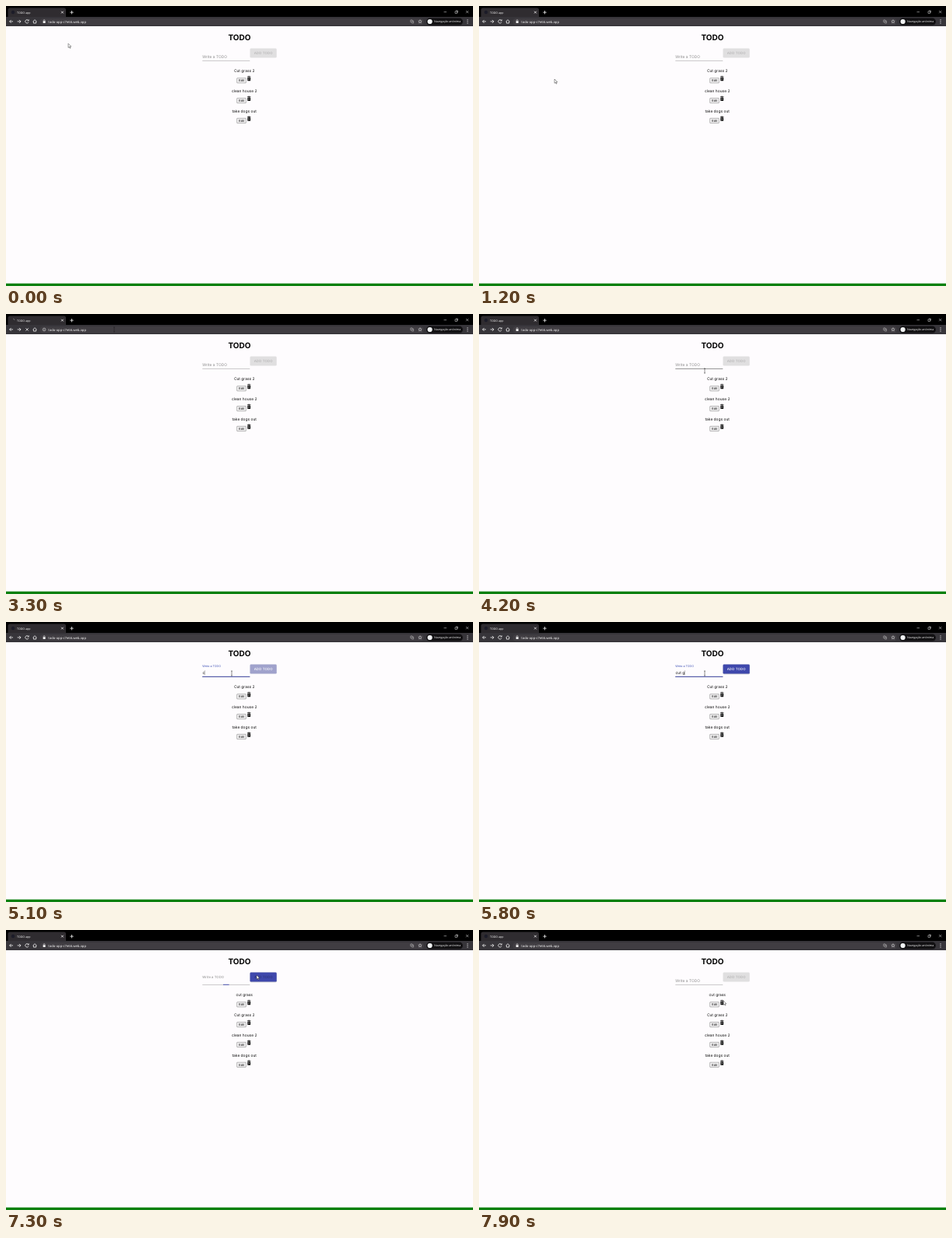
Recreate the animation shown at these times as an HTML page. Size 600x360 px, loop 8 s.

```html
<!DOCTYPE html>
<html lang="en">
<head>
<meta charset="utf-8">
<title>TODO app</title>
<style>
  html, body { margin: 0; width: 100%; height: 100%; overflow: hidden; background: #fefcfe; }
  svg { display: block; width: 100%; height: 100%; }
  text { font: 4.9px Inter, "Liberation Sans", sans-serif; fill: #111; text-rendering: geometricPrecision; white-space: pre; }
  .mid { text-anchor: middle; }
  .title { font-size: 10px; font-weight: 700; fill: #000; }
  .edit { font: 4.2px "Liberation Sans", sans-serif; }
  .add { font-size: 4.375px; font-weight: 500; letter-spacing: .125px; }
  .chrome text { font: 500 3.6px "Open Sans", "Noto Sans", sans-serif; fill: #fff; }
  .chrome .url { font-size: 4.2px; }
  .icon { fill: none; stroke: #f2f2f2; stroke-width: .8; }
  .thin { stroke-width: .5; }
</style>
</head>
<body>
<svg viewBox="0 0 600 360">
  <defs>
    <g id="bin">
      <path d="M310 90.800h4.400M311.300 90.400h1.800" stroke="#111" stroke-width=".7"/>
      <rect x="310.300" y="91.700" width="3.800" height="4.500" rx=".5" fill="#111"/>
      <path d="M311.400 93l1.600 1.600m0-1.600l-1.600 1.600" stroke="#fff" stroke-width=".45"/>
    </g>
  </defs>
  <rect width="600" height="360" fill="#fefcfe"/>
  <rect y="356.700" width="600" height="3.300" fill="#0a800f"/>

  <g class="chrome">
    <rect width="600" height="14" fill="#000"/>
    <rect x="2.500" y="2.500" width="74.500" height="14" rx="2.500" fill="#2f2c30"/>
    <rect y="14" width="600" height="12" fill="#37353a"/>
    <text x="14" y="9.500">TODO app</text>
    <path class="icon" d="M71 6.700l2.800 2.800m0-2.800l-2.800 2.800M84.500 6v4.400m-2.200-2.200h4.400"/>
    <path class="icon thin" d="M562.500 7.700h3.500M577 6.800h2.600v2.600H577zM578 6h2.400v2.600M591 6l3.200 3.200m0-3.200L591 9.200"/>

    <rect id="bar" x="43.400" y="15.900" width="493.400" height="8.600" rx="4.300" fill="#403d42" stroke-width=".6"/>
    <path class="icon" d="M9 19.900H4.600m2-2l-2 2 2 2M14.600 19.900H19m-2-2l2 2-2 2M34.500 20L37 17.700l2.500 2.300M35.400 19.600v2.500h3.200v-2.500"/>
    <g id="idle">
      <circle cx="9" cy="8" r="2.200" fill="#1c1c28"/>
      <path class="icon" d="M28.700 18.500A2.200 2.200 0 1 0 29 20.700M29.200 17.300v1.700h-1.700"/>
      <rect x="47.600" y="19.300" width="3" height="2.600" fill="#fff"/>
      <path class="icon thin" d="M48.200 19.300v-.8a.9.9 0 0 1 1.800 0v.8"/>
    </g>
    <g id="loading" class="icon">
      <path class="thin" d="M9 6A2.200 2.200 0 0 1 11 8" opacity=".6"/>
      <path d="M25.400 18.200l3.400 3.400m0-3.400l-3.400 3.400"/>
      <circle class="thin" cx="49.100" cy="20" r="1.900"/>
      <path class="thin" d="M49.100 19.600v1.500m0-2.400v.5"/>
    </g>
    <rect id="selection" x="54.200" y="17.200" width="49" height="6" fill="#8ab4f8"/>
    <text id="url" class="url" x="54.300" y="21.500">todo-app-c7e66.web.app</text>
    <path class="icon thin" opacity=".8" d="M519.800 18h2.200v2.800h-2.200zM522 19.200h1.600v2.800h-2.400"/>
    <polygon id="star" class="icon thin"/>
    <rect x="540" y="15.600" width="47" height="9" rx="4.500" fill="#121113"/>
    <circle cx="544.600" cy="20" r="3.100" fill="#f1f3f4"/>
    <text x="550" y="21.300">Navegação anónima</text>
    <path d="M593 17.300v5.400" stroke="#eee" stroke-dasharray="1.1"/>
  </g>

  <text class="mid title" x="300" y="44.400">TODO</text>

  <rect id="line" x="252.300" y="70" width="61" height=".6"/>
  <rect id="focusLine" y="69.800" height=".9" fill="#3f48b0"/>
  <text id="label">Write a TODO</text>
  <text x="252.500" y="66.600"><tspan id="typed"></tspan><tspan id="caret" font-weight="300" dx="-.4">|</tspan></text>

  <rect id="shadow" x="313.700" y="55.300" width="34" height="12" rx="1.300" opacity=".25"/>
  <rect x="313.500" y="54.600" width="34.200" height="12" rx="1.300" fill="#e0dfe0"/>
  <rect id="blue" x="313.500" y="54.600" width="34.200" height="12" rx="1.300" fill="#3f48ac"/>
  <text id="add" class="mid add" x="330.700" y="62.200">ADD TODO</text>

  <g id="list"></g>
  <path id="arrow" d="M0 0V5.300L1.300 4.100L2.200 6.100L3 5.700L2.200 3.800H3.800Z" fill="#fff" stroke="#222" stroke-width=".45"/>
  <path id="beam" d="M-1-3H1M0-3V3M-1 3H1" fill="none" stroke-width=".5"/>
</svg>
<script>
const LOOP = 8000, STEP = 100;
const RELOAD = 3300, FOCUS = 4700, TYPE = 5100, KEY_GAP = 150, SUBMIT = 7300;
const NEW_TODO = 'cut grass';
const TODOS = ['Cut grass 2', 'clean house 2', 'take dogs out'];

const $ = id => document.getElementById(id);
const show = (id, on) => $(id).setAttribute('visibility', on ? 'visible' : 'hidden');
const set = (id, attrs) => { for (const k in attrs) $(id).setAttribute(k, attrs[k]); };
const within = (t, from, to) => t >= from && t < to;
const ramp = (t, from, length) => Math.min(1, Math.max(0, (t - from) / length));
const smooth = p => p * p * (3 - 2 * p);

const MOVES = [
  { at: 300, length: 500, x: 97, y: 94 },
  { at: 1700, length: 500, x: 281, y: 198 },
  { at: 2200, length: 400, x: 139, y: 20 },
  { at: 3700, length: 500, x: 290, y: 73 },
  { at: 4200, length: 200, x: 291, y: 142 },
  { at: 4400, length: 300, x: 290, y: 66 },
  { at: 6700, length: 300, x: 322, y: 58 },
  { at: 7400, length: 500, x: 314, y: 91 }
];

function pointerAt(t) {
  return MOVES.reduce((p, m) => {
    const k = smooth(ramp(t, m.at, m.length));
    return { x: p.x + (m.x - p.x) * k, y: p.y + (m.y - p.y) * k };
  }, { x: 80, y: 48.3 });
}

const row = (name, i) => `<g transform="translate(0 ${i * 25.83})">
  <text class="mid" x="306.200" y="85.300">${name}</text>
  <rect x="296.700" y="92.700" width="11.600" height="6.200" rx=".4" fill="#f3f2f3" stroke="#666" stroke-width=".45"/>
  <text class="mid edit" x="302.500" y="97.300">Edit</text>
  <use href="#bin"/></g>`;

let shownNames;
function drawList(t) {
  const names = within(t, RELOAD + 100, RELOAD + 300) ? [] : t >= SUBMIT ? [NEW_TODO, ...TODOS] : TODOS;
  if (names.join() === shownNames) return;
  shownNames = names.join();
  $('list').innerHTML = names.map(row).join('');
}

function drawBrowser(t) {
  const loading = within(t, RELOAD, RELOAD + 100), editing = within(t, 2700, RELOAD);
  show('idle', !loading);
  show('loading', loading);
  show('selection', editing);
  set('bar', { stroke: editing ? '#8ab4f8' : 'none' });
  $('url').style.fill = editing ? '#202124' : '#fff';
}

function drawForm(t, hover) {
  const left = ramp(t, SUBMIT - 100, 200);
  const lift = ramp(t, FOCUS, 200) * (1 - left);
  const wide = ramp(t, FOCUS, 200) * (1 - left) ** 3;
  const on = ramp(t, TYPE - 100, 250) * (1 - ramp(t, SUBMIT, 200));
  const submitted = t >= SUBMIT;

  set('label', { transform: `translate(252.3 ${66.6 - 8.3 * lift}) scale(${1 - .25 * lift})` });
  $('label').style.fill = within(t, FOCUS + 100, SUBMIT) ? '#3f51b5' : '#8c8c8c';
  set('line', { fill: hover ? '#555' : '#aaa' });
  set('focusLine', { x: 282.8 - 30.5 * wide, width: 61 * wide });

  const typedCount = submitted ? 0 : Math.max(0, Math.floor((t - TYPE) / KEY_GAP) + 1);
  $('typed').textContent = NEW_TODO.slice(0, typedCount);
  show('caret', within(t, FOCUS + 200, SUBMIT - 200));

  set('blue', { opacity: on });
  show('shadow', on > .5);
  $('add').style.fill = on < .3 ? '#b4b3b4' : submitted ? '#30377c' : '#fff';
}

function drawPointer({ x, y }, inBar, inField) {
  const transform = `translate(${x} ${y})`;
  show('beam', inBar || inField);
  show('arrow', !inBar && !inField);
  set('arrow', { transform });
  set('beam', { transform, stroke: inBar ? '#1c1b1d' : '#222' });
}

function draw(now) {
  const t = Math.floor(now % LOOP / STEP) * STEP;
  const p = pointerAt(t);
  const inBar = within(p.x, 54, 515) && within(p.y, 15, 25);
  const inField = within(p.x, 252, 313) && within(p.y, 59, 74);
  drawBrowser(t);
  drawForm(t, inField);
  drawList(t);
  drawPointer(p, inBar, inField);
}

set('star', { points: Array.from({ length: 10 }, (_, i) => {
  const r = i % 2 ? 1.1 : 2.3, a = i * Math.PI / 5;
  return `${532 + r * Math.sin(a)},${20 - r * Math.cos(a)}`;
}).join(' ') });

const start = performance.now();
function tick() {
  draw(performance.now() - start);
  requestAnimationFrame(tick);
}
tick();
</script>
</body>
</html>
```
